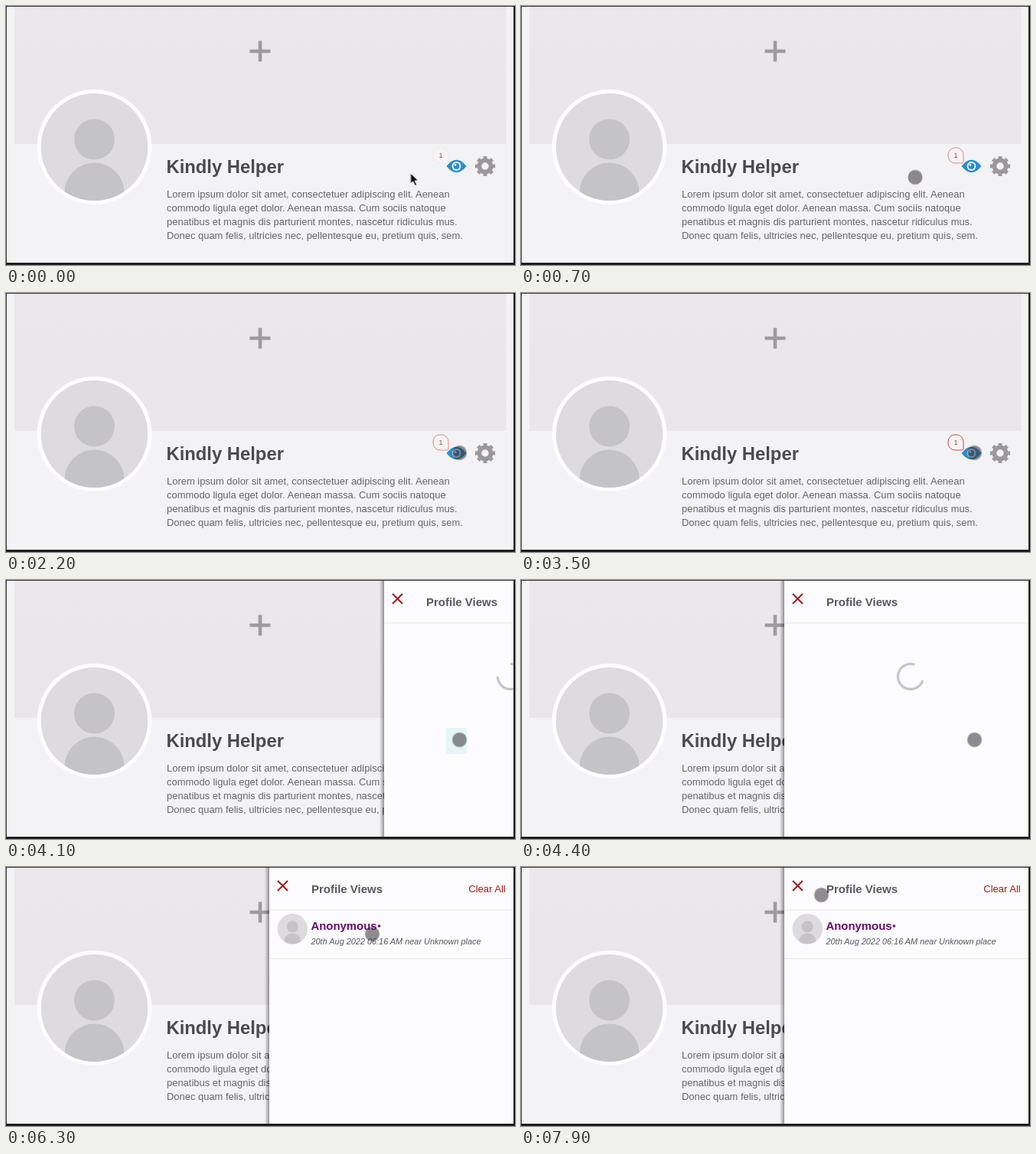
These frames come from a looping animation (665x338 px, 8000 ms). An HTML page:

```html
<!DOCTYPE html>
<html lang="en">
<head>
<meta charset="utf-8">
<title>Profile views</title>
<style>
html, body { margin: 0; width: 100%; height: 100%; overflow: hidden; background: #f3f2f4; }
svg { display: block; width: 665px; height: 338px; font-family: "Liberation Sans", Arial, sans-serif; }
.bold { font-weight: 700; }
.body { font-size: 12.95px; fill: #68666a; }

/* One 8 s timeline; every step lasts 100 ms (1.25 %). */
.panel, .dot, .arrow, .tap, .loading, .loaded {
  animation: 8s -20ms step-end infinite;
}
.panel { animation-name: slide; }
.dot { animation-name: travel, dot-on; }
.arrow { animation-name: drift, arrow-on; }
.tap { animation-name: tap; }
.loading { animation-name: until-loaded; }
.loaded { animation-name: after-loaded; }
.ring { animation: blink 1s -20ms infinite; }
.spinner {
  transform-box: fill-box;
  transform-origin: center;
  animation: spin 1s -20ms steps(10) infinite;
}

@keyframes slide {
  0%, 46.25% { transform: translateX(335px); }
  47.5% { transform: translateX(305px); animation-timing-function: steps(3); }
  51.25% { transform: translateX(150px); animation-timing-function: steps(3); }
  55%, 100% { transform: none; }
}
@keyframes travel {
  0%, 5% { transform: translate(508px, 229px); animation-timing-function: steps(6); }
  12.5% { transform: translate(522px, 218px); animation-timing-function: steps(3); }
  16.25% { transform: translate(548.5px, 215.5px); animation-timing-function: steps(5); }
  22.5% { transform: translate(591px, 210px); animation-timing-function: steps(2); }
  25% { transform: translate(589px, 216px); animation-timing-function: steps(2); }
  27.5%, 56.25% { transform: translate(592.5px, 208.5px); animation-timing-function: steps(6); }
  63.75% { transform: translate(466px, 97px); animation-timing-function: steps(4); }
  68.75% { transform: translate(455px, 91px); animation-timing-function: steps(3); }
  72.5% { transform: translate(440px, 86px); animation-timing-function: steps(5); }
  78.75%, 90% { transform: translate(478.5px, 87.5px); animation-timing-function: steps(7); }
  98.75%, 100% { transform: translate(392.5px, 36.5px); }
}
@keyframes drift {
  0% { transform: translate(528.5px, 218px); animation-timing-function: steps(4); }
  5%, 100% { transform: translate(504px, 229px); }
}
@keyframes dot-on { 0% { opacity: 0; } 5%, 100% { opacity: 1; } }
@keyframes arrow-on { 0% { opacity: 1; } 5%, 100% { opacity: 0; } }
@keyframes tap {
  0% { opacity: 0; }
  46.25% { opacity: .3; animation-timing-function: steps(7); }
  55%, 100% { opacity: 0; }
}
@keyframes until-loaded { 0% { opacity: 1; } 57.5%, 100% { opacity: 0; } }
@keyframes after-loaded { 0% { opacity: 0; } 57.5%, 100% { opacity: 1; } }
@keyframes blink {
  0%, 100% { opacity: .06; animation-timing-function: steps(3); }
  30% { opacity: .88; animation-timing-function: steps(2); }
  50% { opacity: 1; animation-timing-function: steps(5); }
}
@keyframes spin { from { transform: rotate(-126deg); } to { transform: rotate(234deg); } }
</style>
</head>
<body>
<svg viewBox="0 0 665 338">
  <defs>
    <clipPath id="round"><circle r="70"/></clipPath>
    <g id="avatar" clip-path="url(#round)">
      <circle r="70" fill="#dddbde"/>
      <circle cy="-10" r="26.5" fill="#c4c3c5"/>
      <circle cy="59.5" r="39" fill="#c4c3c5"/>
    </g>
    <linearGradient id="cover" x2="0" y2="1">
      <stop stop-color="#eae8eb"/>
      <stop offset="1" stop-color="#e8e6e9"/>
    </linearGradient>
    <linearGradient id="shade">
      <stop stop-color="#000" stop-opacity="0"/>
      <stop offset="1" stop-color="#000" stop-opacity=".38"/>
    </linearGradient>
  </defs>

  <rect width="665" height="338" fill="#f3f2f4"/>
  <rect x="11" width="642.5" height="180" fill="url(#cover)"/>
  <path d="M318.5 59h27M332 45.5v27" stroke="#9d9b9e" stroke-width="4.6"/>
  <circle cx="115.5" cy="184" r="75" fill="#fdfcfe"/>
  <use href="#avatar" x="115.5" y="184"/>

  <text x="209.5" y="218" class="bold" font-size="23.8" fill="#4b4a4d">Kindly Helper</text>
  <g class="body">
    <text x="210" y="249.5">Lorem ipsum dolor sit amet, consectetuer adipiscing elit. Aenean</text>
    <text x="210" y="267.6">commodo ligula eget dolor. Aenean massa. Cum sociis natoque</text>
    <text x="210" y="285.7">penatibus et magnis dis parturient montes, nascetur ridiculus mus.</text>
    <text x="210" y="303.8">Donec quam felis, ultricies nec, pellentesque eu, pretium quis, sem.</text>
  </g>

  <g class="eye">
    <path d="M575.5 209Q588.5 192.5 601.5 209Q588.5 225.5 575.5 209Z" fill="#2b8dcb"/>
    <circle cx="588.5" cy="209" r="5.9" fill="#f3f2f4"/>
    <circle cx="588.5" cy="209" r="4" fill="#2b8dcb"/>
    <circle cx="587" cy="207.5" r="1.4" fill="#f3f2f4"/>
  </g>
  <path d="M568 185a10 10 0 0 1 10 10v10h-10a10 10 0 0 1 0-20z" fill="#f6f4f5"/>
  <path class="ring" d="M567 185h2a9 9 0 0 1 9 9v9a2 2 0 0 1-2 2h-9a9 9 0 0 1-9-9v-2a9 9 0 0 1 9-9z" fill="none" stroke="#d2494f"/>
  <text x="568" y="198" font-size="9" text-anchor="middle" fill="#b8363c">1</text>
  <g fill="none" stroke="#9a989b" transform="translate(626 209)">
    <circle r="7.6" stroke-width="5.8"/>
    <circle r="11.1" stroke-width="4" pathLength="16" stroke-dasharray="1.1 .9" stroke-dashoffset=".55"/>
  </g>

  <g class="panel">
    <rect x="338" width="6" height="338" fill="url(#shade)"/>
    <rect x="344" width="321" height="338" fill="#fcfbfd"/>
    <path d="M344 56h321" stroke="#e6e5e8"/>
    <path d="M355 18l13 13m0-13l-13 13" stroke="#a31a1c" stroke-width="2"/>
    <text x="399" y="33.5" class="bold" font-size="15" fill="#59585b">Profile Views</text>
    <g class="loading">
      <circle class="spinner" cx="509" cy="126" r="16.5" fill="none" stroke="#c2c1c4" stroke-width="3" pathLength="100" stroke-dasharray="75 25"/>
    </g>
    <g class="loaded">
      <text x="604.3" y="33" font-size="13" fill="#a31a1c">Clear All</text>
      <use href="#avatar" transform="translate(374.3 80.7) scale(.284)"/>
      <text x="398.5" y="81.5" class="bold" font-size="14.9" fill="#6a0d6c">Anonymous</text>
      <circle cx="487.4" cy="77" r="1.8" fill="#6a0d6c"/>
      <text x="398.5" y="100.8" font-size="10.9" font-style="italic" fill="#59585b">20th Aug 2022 06:16 AM near Unknown place</text>
      <path d="M344 119.5h321" stroke="#e6e5e8"/>
    </g>
  </g>

  <rect class="tap" x="575" y="193" width="27" height="34" fill="#50c8c8"/>
  <circle class="dot" r="9.5" fill="#343236" fill-opacity=".55"/>
  <path class="arrow" d="M0 0v14l3.3-3 2.4 5.6 2.6-1.1-2.4-5.5h4.4z" fill="#111" stroke="#fff"/>

  <g fill="#1d1e23">
    <rect width="665" height="1" opacity=".85"/>
    <rect width="1" height="338" opacity=".85"/>
    <rect x="663" width="2" height="338"/>
    <rect y="335" width="665" height="3"/>
  </g>
</svg>
</body>
</html>
```
